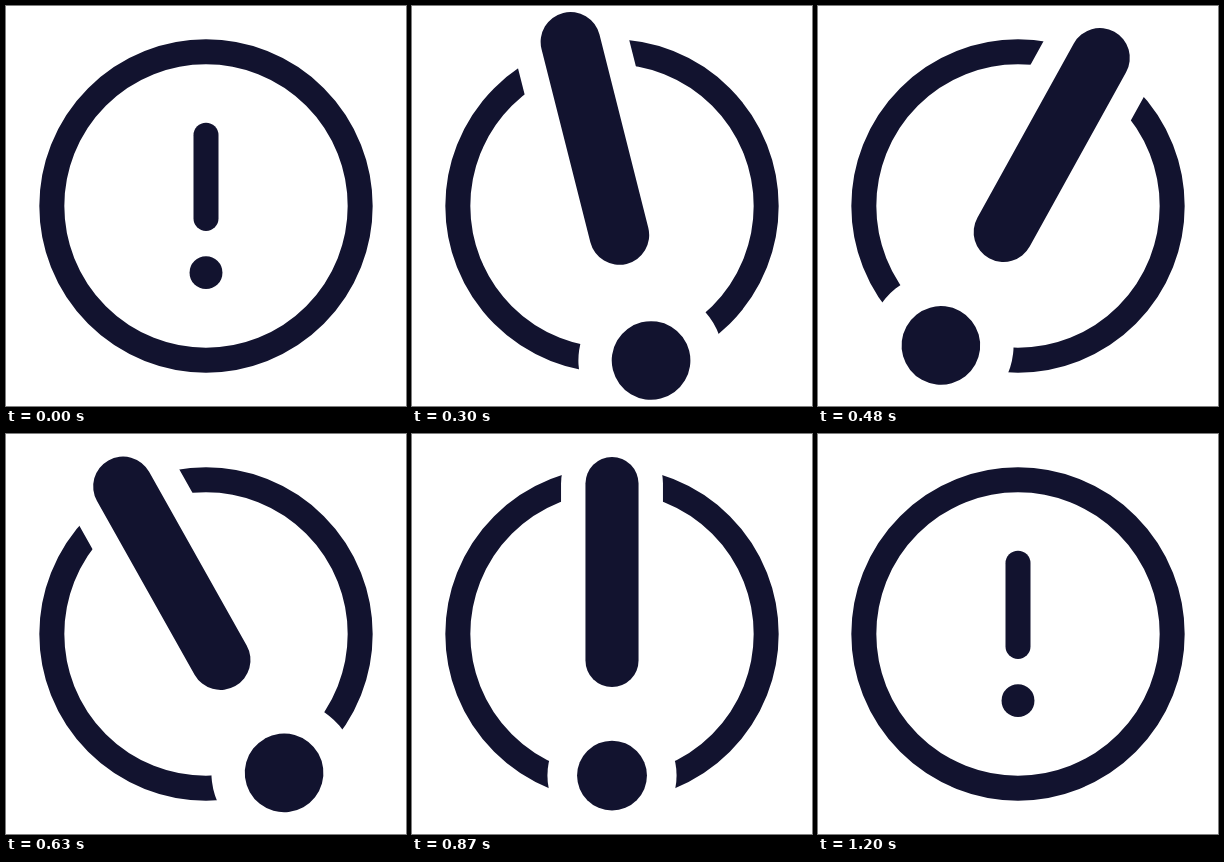
An HTML page that plays this animation: 400 px wide and 400 px high, repeating every 3.23 s.

```html
<!DOCTYPE html>
<html lang="en">
<head>
<meta charset="utf-8">
<title>Alert icon</title>
<style>
  html, body { margin: 0; width: 100%; height: 100%; overflow: hidden; background: #fff; }
  svg { display: block; width: 100%; height: 100%; }
  circle, path { fill: none; stroke-linecap: round; }
  .ink { stroke: #12132f; }
  .halo { stroke: #fff; }
</style>
</head>
<body>
<svg viewBox="0 0 400 400">
  <circle class="ink" cx="200" cy="200" r="154.17" stroke-width="25"/>
  <g id="mark">
    <path class="halo" d="M200 129.17V212.5" stroke-width="48"/>
    <path class="halo" d="M200 266.67h.01" stroke-width="60.8"/>
    <path class="ink" d="M200 129.17V212.5" stroke-width="25"/>
    <path class="ink" d="M200 266.67h.01" stroke-width="32.9"/>
  </g>
</svg>
<script>
const LOOP = 3230, STEP = 30, END = 1200;
const mark = document.getElementById('mark');

// [time in ms, value]
const ANGLE = [[0, 0], [120, 0], [310, -14.3], [468, 30], [620, -29.6], [802, 0]];
const SCALE = [[0, 1], [300, 2.39], [780, 2.39], [1200, 1]];

// cubic-bezier(x1, 0, x2, 1)
const bezier = (x1, x2) => p => {
  let lo = 0, hi = 1;
  for (let i = 0; i < 24; i++) {
    const u = (lo + hi) / 2, v = 1 - u;
    if (3 * v * v * u * x1 + 3 * v * u * u * x2 + u * u * u < p) lo = u;
    else hi = u;
  }
  return lo * lo * (3 - 2 * lo);
};
const swing = bezier(1 / 3, 2 / 3);
const settle = bezier(0.33, 0.286);

function at(keys, t, ease) {
  const i = keys.findIndex(k => k[0] > t);
  if (i < 0) return keys[keys.length - 1][1];
  const [t0, a] = keys[i - 1], [t1, b] = keys[i];
  return a + (b - a) * ease((t - t0) / (t1 - t0));
}

function draw(ms) {
  const t = Math.min(END, Math.floor((ms % LOOP) / STEP) * STEP);
  const angle = at(ANGLE, t, swing), scale = at(SCALE, t, settle);
  mark.setAttribute('transform',
    `translate(200 200) rotate(${angle}) scale(${scale}) translate(-200 -200)`);
}

let start;
function tick(now) {
  start ??= now;
  draw(now - start);
  requestAnimationFrame(tick);
}
draw(0);
requestAnimationFrame(tick);
</script>
</body>
</html>
```
